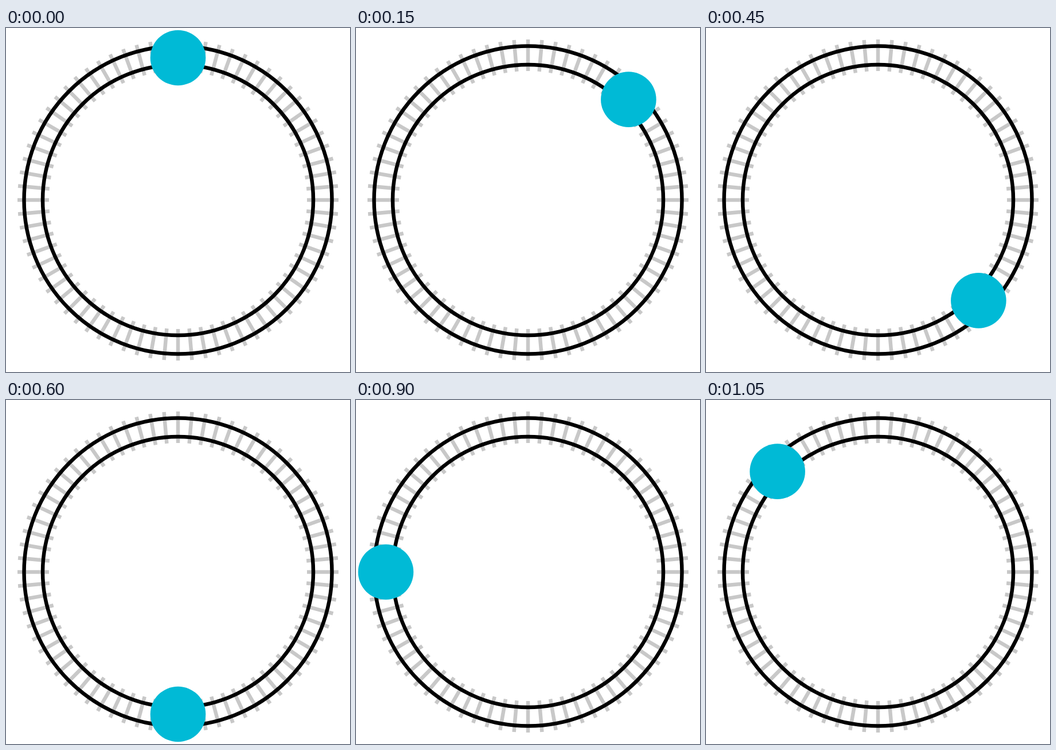
An HTML page for the animation above (1.2 s loop, 600 by 600 pixels).

```html
<!DOCTYPE html>
<html lang="en">
<head>
<meta charset="utf-8">
<title>Ball on a round track</title>
<style>
  html, body { margin: 0; width: 100%; height: 100%; overflow: hidden; background: #fff; }
  svg { display: block; width: 100%; height: 100%; }
</style>
</head>
<body>
<svg viewBox="-300 -300 600 600">
  <g id="ties" stroke="#c8c8c8" stroke-width="6.5"></g>
  <g fill="none" stroke="#000" stroke-width="6.5">
    <circle r="268.5"/>
    <circle r="236"/>
  </g>
  <circle id="ball" cy="-248" r="48.3" fill="#00bad6"/>
</svg>
<script>
  const LOOP = 1200, STOPS = 8, TIES = 72;
  const ties = document.getElementById('ties');
  const ball = document.getElementById('ball');

  for (let i = 0; i < TIES; i++) {
    const tie = document.createElementNS('http://www.w3.org/2000/svg', 'path');
    tie.setAttribute('d', 'M0-280V-225');
    tie.setAttribute('transform', `rotate(${i * 360 / TIES})`);
    ties.append(tie);
  }

  // The ball jumps clockwise from stop to stop.
  function draw() {
    const stop = Math.floor(performance.now() % LOOP / LOOP * STOPS);
    ball.setAttribute('transform', `rotate(${stop * 360 / STOPS})`);
    requestAnimationFrame(draw);
  }
  draw();
</script>
</body>
</html>
```
